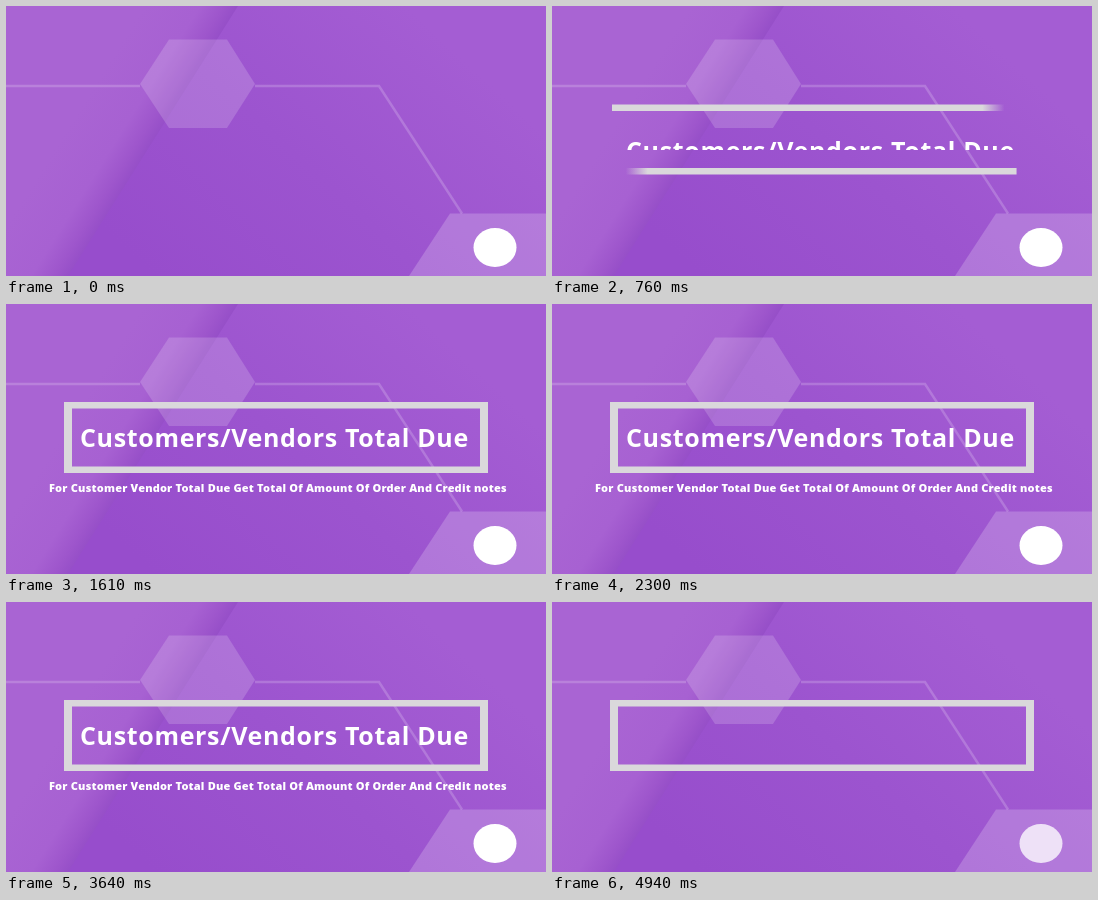
Write an HTML page that moves like this. It is 540 px wide and 270 px high and loops after 5 s.

```html
<!DOCTYPE html>
<html lang="en">
<head>
<meta charset="utf-8">
<title>Customers/Vendors Total Due</title>
<style>
  html, body { margin: 0; width: 100%; height: 100%; overflow: hidden; background: #a05ad0; }
  svg { display: block; width: 540px; height: 270px; }
  text { fill: #fff; font-family: "Open Sans", "Noto Sans", sans-serif; }
  #title { font-size: 25px; font-weight: 700; letter-spacing: .66px; }
  #sub { font-size: 11px; font-weight: 800; letter-spacing: .18px; }
</style>
</head>
<body>
<svg viewBox="0 0 540 270" xmlns="http://www.w3.org/2000/svg">
  <defs>
    <linearGradient id="base" gradientUnits="userSpaceOnUse" x1="150" y1="270" x2="400" y2="0">
      <stop offset="0" stop-color="#974dcc"/>
      <stop offset=".5" stop-color="#9c54cf"/>
      <stop offset="1" stop-color="#a45dd3"/>
    </linearGradient>
    <linearGradient id="fold" gradientUnits="userSpaceOnUse" x1="80" y1="93" x2="147" y2="135">
      <stop offset="0" stop-color="#a964d3"/>
      <stop offset=".6" stop-color="#a761d2"/>
      <stop offset=".85" stop-color="#9e56cc"/>
      <stop offset="1" stop-color="#964fc8"/>
    </linearGradient>
    <linearGradient id="topFade" gradientUnits="userSpaceOnUse" y1="0" y2="0">
      <stop offset="0" stop-color="#dad8db"/>
      <stop offset="1" stop-color="#dad8db" stop-opacity="0"/>
    </linearGradient>
    <linearGradient id="bottomFade" gradientUnits="userSpaceOnUse" y1="0" y2="0">
      <stop offset="0" stop-color="#dad8db"/>
      <stop offset="1" stop-color="#dad8db" stop-opacity="0"/>
    </linearGradient>
    <clipPath id="titleClip"><rect x="60" y="110" width="420" height="34"/></clipPath>
    <clipPath id="subClip"><rect x="30" y="172" width="490" height="16.5"/></clipPath>
  </defs>

  <rect width="540" height="270" fill="url(#base)"/>
  <path d="M0 0H232L62 270H0Z" fill="url(#fold)"/>
  <path d="M134 78L163 33.5H221L249 78L221 122H163Z" fill="#fff" fill-opacity=".17"/>
  <path d="M0 80H134M249 80H373L456 207.5" fill="none" stroke="#fff" stroke-opacity=".19" stroke-width="2.5"/>
  <path d="M444 207.5H540V270H403Z" fill="#fff" fill-opacity=".2"/>

  <g fill="#dad8db">
    <rect id="top" fill="url(#topFade)"/>
    <rect id="bottom" fill="url(#bottomFade)"/>
    <rect id="left"/>
    <rect id="right"/>
  </g>

  <g clip-path="url(#titleClip)"><text id="title" x="74" y="143">Customers/Vendors Total Due</text></g>
  <g clip-path="url(#subClip)"><text id="sub" x="43" y="188">For Customer Vendor Total Due Get Total Of Amount Of Order And Credit notes</text></g>

  <ellipse id="badge" cx="489" cy="241.5" rx="21.5" ry="19.5" fill="#fff"/>
</svg>
<script>
  const LOOP = 5000;
  const BAR = 6.5, SIDE = 8, SOFT = 22;
  const $ = id => document.getElementById(id);
  const set = (id, attrs) => {
    const el = $(id);
    for (const key in attrs) el.setAttribute(key, attrs[key]);
  };
  const easeOut = p => 1 - (1 - p) ** 2;
  const linear = p => p;

  // Interpolates a list of [time, value] pairs.
  function track(t, keys, ease = linear) {
    if (t <= keys[0][0]) return keys[0][1];
    for (let i = 1; i < keys.length; i++) {
      const [t0, a] = keys[i - 1], [t1, b] = keys[i];
      if (t < t1) return a + (b - a) * ease((t - t0) / (t1 - t0));
    }
    return keys[keys.length - 1][1];
  }

  function drawFrame(t) {
    const x0 = track(t, [[200, 72], [760, 60], [1300, 58]]);
    const x1 = track(t, [[200, 452], [760, 464.5], [1100, 480], [1300, 482]]);
    const y0 = track(t, [[200, 99.5], [760, 98.5], [1300, 98]]);
    const y1 = track(t, [[200, 167.5], [760, 168.5], [1300, 169]]);
    const topTip = track(t, [[200, 70], [760, 452], [900, 510]]);
    const bottomTip = track(t, [[200, 456], [760, 74], [900, 30]]);
    const side = track(t, [[860, 0], [1100, 1]], easeOut) * (y1 - y0);
    const width = x1 - x0;

    set("top", { x: x0, y: y0, width, height: BAR });
    set("bottom", { x: x0, y: y1 - BAR, width, height: BAR });
    set("topFade", { x1: topTip - SOFT, x2: topTip });
    set("bottomFade", { x1: bottomTip + SOFT, x2: bottomTip });
    set("left", { x: x0, y: y1 - side, width: SIDE, height: side });
    set("right", { x: x1 - SIDE, y: y0, width: SIDE, height: side });
  }

  function draw(t) {
    drawFrame(t);
    const fade = track(t, [[4760, 1], [4940, 0]]);
    const titleDrop = track(t, [[600, 24], [760, 11], [1050, 0]], easeOut);
    const subDrop = track(t, [[1120, 12], [1210, 5], [1450, 0]], easeOut);
    set("title", { transform: `translate(0 ${titleDrop})`, opacity: fade });
    set("sub", { transform: `translate(0 ${subDrop})`, opacity: fade });
    set("badge", { opacity: .78 + .22 * fade });
  }

  const start = performance.now();
  function tick() {
    draw((performance.now() - start) % LOOP);
    requestAnimationFrame(tick);
  }
  tick();
</script>
</body>
</html>
```
